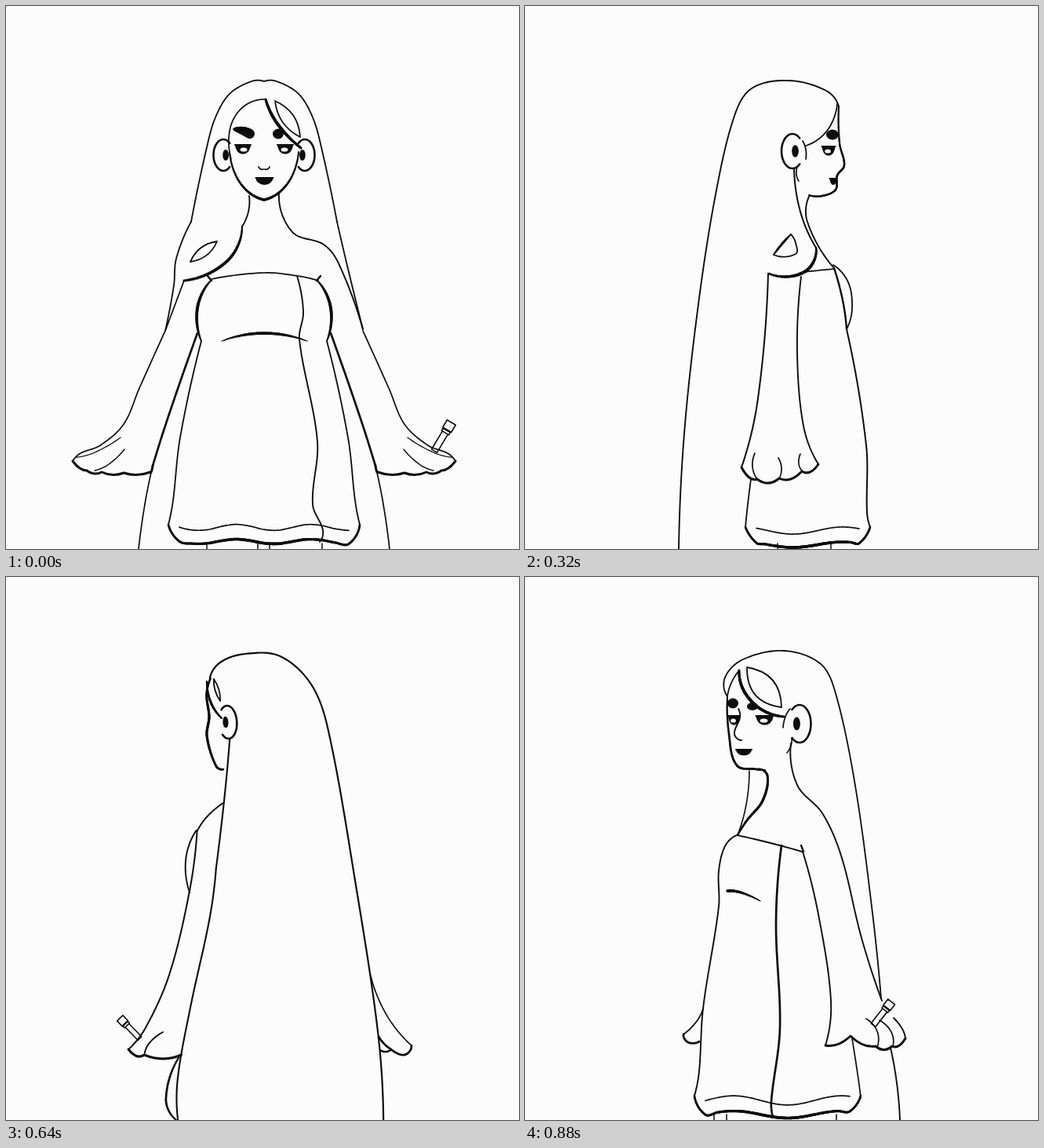
Recreate the animation shown at these times as an HTML page with a canvas. Size 654 by 692 pixels, loop 1040 ms.

```html
<!DOCTYPE html>
<html lang="en">
<head>
<meta charset="utf-8">
<title>Turnaround</title>
<style>
html, body { margin: 0; width: 100%; height: 100%; overflow: hidden; background: #fcfcfc; }
canvas { display: block; }
</style>
</head>
<body>
<canvas id="stage" width="654" height="692"></canvas>
<script>
const ctx = document.getElementById('stage').getContext('2d');
const PAPER = '#fcfcfc', INK = '#0d0d0d', TAU = Math.PI * 2;

const parse = s => s.split(' ').map(p => p.split(',').map(Number));
const mix = (a, b, t) => a + (b - a) * t;

// Angle of the curve at each point; the ends continue the arc of their neighbour
function headings(pts) {
  const aim = (a, b) => Math.atan2(b[1] - a[1], b[0] - a[0]);
  const n = pts.length - 1;
  const out = pts.map((p, i) => aim(pts[Math.max(0, i - 1)], pts[Math.min(n, i + 1)]));
  if (n > 1) {
    out[0] = 2 * out[0] - out[1];
    out[n] = 2 * out[n] - out[n - 1];
  }
  return out;
}

// Smooth curve through a few points, cut into short pieces
function smooth(pts) {
  const dir = headings(pts), out = [pts[0]], steps = 14;
  for (let i = 1; i < pts.length; i++) {
    const a = pts[i - 1], d = pts[i], r = Math.hypot(d[0] - a[0], d[1] - a[1]) / 3;
    const b = [a[0] + r * Math.cos(dir[i - 1]), a[1] + r * Math.sin(dir[i - 1])];
    const c = [d[0] - r * Math.cos(dir[i]), d[1] - r * Math.sin(dir[i])];
    for (let k = 1; k <= steps; k++) {
      const t = k / steps, u = 1 - t;
      out.push([0, 1].map(j =>
        u * u * u * a[j] + 3 * u * u * t * b[j] + 3 * u * t * t * c[j] + t * t * t * d[j]));
    }
  }
  return out;
}

function stroke(pts, w) {
  ctx.lineWidth = w;
  ctx.beginPath();
  pts.forEach(p => ctx.lineTo(p[0], p[1]));
  ctx.stroke();
}

// Line whose width goes from w through mid to end
function pen(s, w = 1.9, mid = w, end = w) {
  const pts = smooth(typeof s === 'string' ? parse(s) : s);
  if (mid === w && end === w) return stroke(pts, w);
  for (let i = 1; i < pts.length; i++) {
    const t = i / pts.length;
    stroke([pts[i - 1], pts[i]], mix(w, end, t) + (mid - (w + end) / 2) * Math.sin(Math.PI * t));
  }
}

// Row of finger tips sagging between the given points
function lumps(s, sag) {
  const pts = parse(s);
  ctx.lineWidth = 3;
  ctx.beginPath();
  pts.forEach(([x, y], i) => {
    if (!i) return ctx.moveTo(x, y);
    const [px, py] = pts[i - 1];
    ctx.quadraticCurveTo((px + x) / 2, (py + y) / 2 + sag, x, y);
  });
  ctx.stroke();
}

// Pointed shape between two tips, with a bulge on each side
function leaf(x0, y0, x1, y1, a, b) {
  const dx = x1 - x0, dy = y1 - y0, len = Math.hypot(dx, dy);
  const bow = k => [(x0 + x1) / 2 + dy / len * k, (y0 + y1) / 2 - dx / len * k];
  ctx.lineWidth = 1.8;
  ctx.beginPath();
  ctx.moveTo(x0, y0);
  ctx.quadraticCurveTo(...bow(a), x1, y1);
  ctx.quadraticCurveTo(...bow(b), x0, y0);
  ctx.stroke();
}

function dot(x, y, rx, ry, color = INK) {
  ctx.fillStyle = color;
  ctx.beginPath();
  ctx.ellipse(x, y, rx, ry, 0, 0, TAU);
  ctx.fill();
}

// Filled lower half of an ellipse
function bowl(x, y, rx, ry) {
  ctx.fillStyle = INK;
  ctx.beginPath();
  ctx.ellipse(x, y, rx, ry, 0, 0, TAU / 2);
  ctx.fill();
  stroke([[x - rx, y], [x + rx, y]], 2);
}

function eye(x, y, r) {
  bowl(x, y, r, 11.5);
  dot(x + 1, y + 6, r * .45, 2.6, PAPER);
}

// Ear open towards the face: face is 1 for right, -1 for left
function ear(x, y, rx, ry, face) {
  const gap = .85, from = face > 0 ? 0 : TAU / 2;
  ctx.lineWidth = 2.6;
  ctx.beginPath();
  ctx.ellipse(x, y, rx, ry, 0, from + gap, from + TAU - gap);
  ctx.stroke();
  dot(x + face * rx * .25, y, rx * .31, ry * .35);
}

// Wavy skirt edge with its inner fold; crest is where a wave hangs lowest
function hem(x0, x1, y, base, amp, crest, period) {
  const wave = (a, b, low, h) => Array.from({ length: 13 }, (_, i) => {
    const x = mix(a, b, i / 12), u = (x - x0) / (x1 - x0);
    return [x, low + h * Math.cos(TAU * (u - crest) / period)];
  });
  pen([[x0, y], ...wave(x0 + 14, x1 - 14, base, amp), [x1, y]], 2.6, 3.6);
  pen(wave(x0 + 14, x1 - 14, base - 18, amp * 1.3), 1.7);
}

const legs = (...xs) => xs.forEach(x => stroke([[x, 685], [x, 692]], 1.5));

// Small stick with a square cap
function stick(x, y, deg, size) {
  ctx.save();
  ctx.translate(x, y);
  ctx.rotate(deg * TAU / 360);
  ctx.scale(size, size);
  ctx.lineWidth = 1.6 / size;
  ctx.strokeRect(-4.5, -31, 9, 31);
  ctx.fillStyle = PAPER;
  ctx.beginPath();
  ctx.rect(-6, -34, 12, 4);
  ctx.rect(-7, -47, 14, 12);
  ctx.fill();
  ctx.stroke();
  ctx.restore();
}

// Mirror so that x and its twin add up to sum + lean * y
function flip(sum, draw, lean = 0) {
  ctx.save();
  ctx.transform(-1, 0, lean, 1, sum, 0);
  draw();
  ctx.restore();
}

function both(draw) {
  draw();
  flip(658, draw);
}

function wideArm() {
  pen('203,414 170,487 150,533 120,560 95,570 85,580', 1.7);
  lumps('85,580 103,592 122,594 150,595 184,594 187,586', 6);
  pen('90,575 113,569 146,550', 1.3);
  pen('113,592 131,584 151,565', 1.5);
}

function front() {
  both(() => {
    pen('329,96 313,96 285,112 267,142 256,180 236,275', 1.8);
    pen('187,586 177,635 169,692', 1.7);
    ear(277, 190, 12.5, 20, 1);
    eye(302, 177, 10);
    pen('322,205 325,208 328,208', 1.8);
    pen('285,186 293,216 309,237 329,247', 1.8, 2.6, 3.4);
    wideArm();
    pen('187,586 208,520 244,417', 2.7);
    pen('257,344 262,350', 2.4);
    pen('261,350 244,385 249,427', 1.8, 3.8);
    pen('249,427 222,550 213,630 207,661', 1.8);
  });
  pen('236,275 217,322 214,356 203,414', 1.8);
  pen('422,275 436,335 455,412', 1.8);
  // face
  pen('331,119 303,128 286,155 287,195', 1.7);
  pen('331,119 346,150 376,181', 3, 4);
  leaf(343, 121, 375, 167, 17, -15);
  pen('291,157 302,159 311,163', 3, 10, 12);
  dot(347, 163, 7, 6.5);
  bowl(329.5, 219, 11, 9);
  // neck and hair lock
  pen('310,242 309,262 301,281');
  pen('348,240 365,288 405,304 424,328 455,412');
  pen('301,281 282,325 227,350', 2, 3.8, 3);
  leaf(235, 326, 269, 300, 12, -12);
  pen('227,350 203,414', 1.7);
  // dress
  pen('262,348 329,340 372,344 398,350', 1.7);
  pen('275,427 329,417 384,427', 1, 3.8);
  pen('371,344 379,390 374,425 397,555 391,635 404,668 400,683');
  hem(207, 451, 661, 682.5, 3, .16, .39);
  legs(256, 321, 336, 403);
  stick(546, 567, 31, .9);
}

// Turned to the right; the other view is its mirror with bare shoulder
function quarter(bare) {
  pen('199,537 211,420 233,260 258,145 277,110 323,94 375,105 398,128 395,152', 1.8);
  pen('187,600 179,645 175,692');
  // face
  pen('324,192 321,178 315,168', 1.7);
  ear(303, 187, 14.5, 24, 1);
  pen('313,206 314,215 319,224', 1.7);
  eye(347.5, 177, 11);
  eye(386.5, 177, 7.5);
  dot(388, 161, 7, 6.5);
  pen('395,153 393,200 383,240 358,245 347,246', 2, 2.8);
  pen('381,168 379,179 386,200 377,208');
  bowl(374, 220, 10, 7.5);
  pen('357,245 344,253 350,285 370,310 382,329', 2, 3.2);
  pen('367,247 371,290 382,329', 1.6);
  // dress
  pen('300,350 340,339 383,329');
  pen('383,329 398,343 406,375 406,420 426,550 431,630 437,661');
  pen('301,342 298,350', 2.4);
  pen('395,400 378,402 353,413', 3.6, 3, 1.2);
  pen('236,588 228,640 225,664', 1.7);
  hem(225, 437, 661, 685, 4.5, .44, .65);
  legs(256, 396, 412);
  // arms
  pen('299,350 279,430 263,540 270,597');
  lumps('168,588 185,598 206,598 238,585 270,597', 9);
  pen('184,598 186,580 201,565', 1.7);
  pen('204,599 204,579 218,563', 1.7);
  pen('426,550 434,566 451,583', 1.8);
  pen('451,583 445,593 431,592', 2.8);

  if (bare) {
    pen('380,119 374,145 353,168 323,178', 3, 4);
    pen('380,119 390,135 395,152', 1.7);
    leaf(370, 115, 326, 166, 30, -28);
    dot(363, 165, 7, 5);
    pen('314,212 306,265 274,301 250,355 224,460 198,540');
    pen('183,562 172,576 168,588');
    pen('326,342 333,440 328,575 339,668 337,688', 2.7);
    stick(209, 571, -38, .8);
  } else {
    pen('368,116 336,139 325,165 324,192', 1.7);
    pen('368,116 377,137 395,153', 2.6, 4);
    leaf(381, 121, 391, 143, 6, -4);
    pen('346,157 357,159 365,164', 3, 10, 11);
    pen('313,208 313,245 319,290 304,330');
    pen('304,330 283,344 253,347', 2, 3.4, 4);
    leaf(265, 316, 303, 288, 12, -28);
    pen('254,350 232,430 205,524 168,588', 1.8);
    stick(432, 559, 22, .7);
  }
}

// Turned to the left; held adds the fringe and the item of the near hand
function side(held) {
  pen('458,692 451,545 433,380 411,240 387,140 365,105 318,95 270,108 254,128');
  pen('254,128 253,175 247,203 256,216 258,234 275,242 292,241', 2, 2.6);
  pen('256,125 269,159 296,178', held ? 3 : 1.8, held ? 4.2 : 1.8);
  if (held) leaf(265, 121, 291, 160, 12, -14);
  dot(262, 164, 8, 6.5);
  eye(267, 179, 8.5);
  bowl(261, 220, 4.5, 8);
  pen('300,172 296,183 296,195', 1.8);
  ear(313, 185, 14, 22, -1);
  pen('307,205 308,215 305,223', 1.7);
  // neck and hair lock
  pen('291,241 294,275 260,334');
  pen('311,207 303,262 283,308', 2);
  pen('283,308 298,339 343,341', 2.4, 4);
  leaf(315, 291, 337, 317, 3, 0);
  pen('315,291 309,302 309,316 337,317', 1.8);
  // dress
  pen('260,335 300,339', 1.7);
  pen('261,330 242,352 237,385 244,412', 1.8);
  pen('260,334 249,375 244,412', 2.4);
  pen('244,412 219,560 218,645 214,664', 2);
  pen('366,603 370,635 373,664', 1.8);
  hem(214, 373, 664, 686.5, 3.5, .62, .8);
  legs(264, 332);
  // arm
  pen('302,345 307,440 299,535 280,584');
  pen('344,341 357,500 378,588', 2);
  lumps('280,584 301,593 330,602 358,603 378,588', 11);
  pen('303,571 305,583 301,592', 1.7);
  pen('331,576 327,589 330,602', 1.7);
  pen('361,570 364,587 358,603', 1.7);
  if (held) {
    leaf(327, 579, 341, 560, 8, -8);
    dot(344, 555, 9, 10);
    dot(344, 555, 7, 8, PAPER);
    dot(345, 556, 5, 5.5);
  }
}

// Seen from behind, turned to the right; fringe shows the other temple
function backQuarter(fringe) {
  pen('195,692 197,580 217,390 243,195 262,137 300,101 345,98 377,109 391,129', 2.2);
  pen('390,129 396,150 394,178 398,203 388,241 379,245', 2.4, 3.2);
  ear(370.5, 185, 11.5, 21, 1);
  pen('394,372 405,435 435,550 455,640 457,692', 2.1);
  // arms
  pen('416,324 429,400 459,505 492,573 516,602', 2);
  pen('417,323 432,360 429,402');
  lumps('449,609 496,609 516,602', 10);
  pen('496,609 489,594 471,580');
  pen('203,508 185,558 155,597', 1.7);
  pen('155,597 165,609 184,600 196,586', 2.8);
  pen('181,602 188,605 195,603', 2.6);
  pen('452,612 471,665 459,692', 2, 2.6);

  if (fringe) {
    pen('395,133 391,160 378,180', 2, 3);
    leaf(386, 130, 379, 158, 5, -5);
    pen('369,206 379,280 394,372', 2.1);
    pen('381,288 402,305 416,324');
    stick(501, 588, 43, .75);
  } else {
    pen('390,129 382,155 381,186', 1.8);
    pen('373,206 379,250 409,300 416,324', 2);
    pen('416,324 413,350 394,368', 2, 4.2, 4);
    leaf(383, 291, 390, 338, 26, 0);
  }
}

function back() {
  both(() => {
    pen('329,96 313,96 285,112 267,142 236,275 203,414 187,586 169,692', 2.1);
    wideArm();
  });
  stick(546, 567, 31, .9);
}

// [end time in ms, pose]
const poses = [
  [160, front],
  [320, () => quarter(false)],
  [400, () => flip(654, () => side(false))],
  [560, () => backQuarter(false)],
  [640, () => flip(654, back)],
  [800, () => flip(645, () => backQuarter(true), .045)],
  [880, () => side(true)],
  [1040, () => flip(653, () => quarter(true))]
];
let shown;

function tick() {
  const t = performance.now() % 1040;
  const pose = poses.find(p => t < p[0])[1];
  if (pose !== shown) {
    shown = pose;
    ctx.fillStyle = PAPER;
    ctx.fillRect(0, 0, 654, 692);
    ctx.strokeStyle = INK;
    ctx.lineCap = ctx.lineJoin = 'round';
    pose();
  }
  requestAnimationFrame(tick);
}
tick();
</script>
</body>
</html>
```
